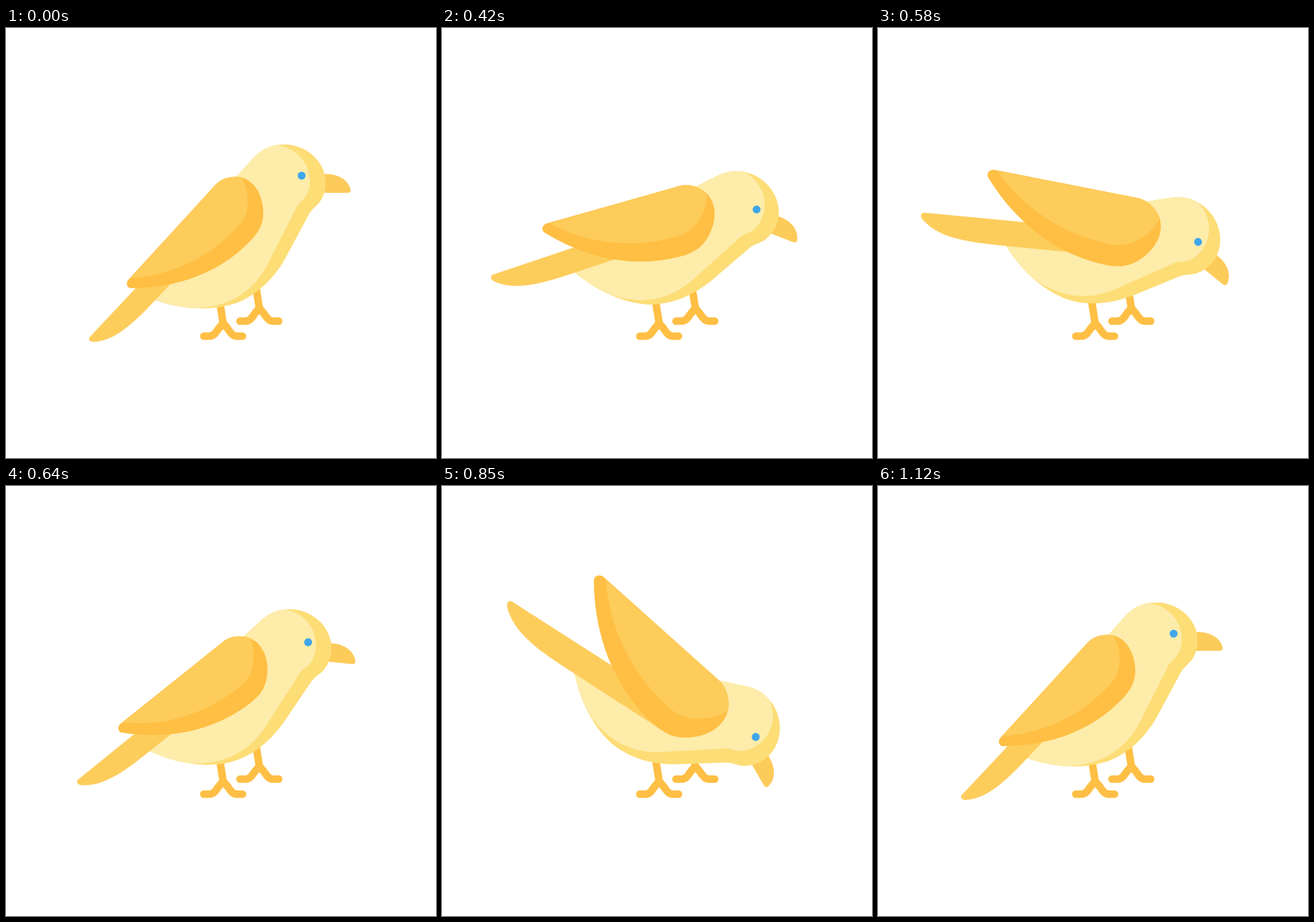
Recreate the animation shown at these times as an HTML page. Size 600 by 600 pixels, loop 1420 ms.

```html
<!DOCTYPE html>
<html lang="en">
<head>
<meta charset="utf-8">
<title>Pecking bird</title>
<style>
  html, body { margin: 0; height: 100%; overflow: hidden; background: #fff; }
  svg { display: block; width: 100%; height: 100%; }
</style>
</head>
<body>
<svg viewBox="0 0 600 600">
  <defs>
    <path id="leg" d="M296 368L303 412M276 430h7c8 0 10-6 14-11l6-7 6 7c4 5 6 11 14 11h7"
      fill="none" stroke="#febf44" stroke-width="10.5" stroke-linecap="round" stroke-linejoin="round"/>
  </defs>
  <use href="#leg" x="50.5" y="-21"/>
  <use href="#leg"/>
  <g id="body">
    <path fill="#fdcb5a" d="M440 204H445C462 203 478 211 481 226C481 229 479 230 477 230H440Z"/>
    <path fill="#fddd76" d="M322 207L340 187C352 172 368 162.5 388 162.5C420 162.5 446 187 446 215C446 230 440 242 433 248C426 254 423 259 421 263L391 319C378 343 355 372 318 385C280 396 240 392 200 377L245 320Z"/>
    <path fill="#fdecaa" d="M322 207L340 187C350 174 362 166 376 163.5C405 166 424 188 424 214C424 228 418 238 410 244C405 249 403 255 400 261L370 320C356 352 328 388 265 391C243 390 225 386 200 377L245 320Z"/>
    <circle cx="412.5" cy="206" r="5.5" fill="#3fa6ea"/>
    <path id="tail" fill="#fdcd5c" d="M117 431L270 268L296 287L209 379C185 404 155 437 122 438C115 438 115 433 117 431Z"/>
    <g id="wing">
      <path fill="#febf44" d="M171 351L292 219C300 210 312 207 322 207.5C345 209 359 232 359 258C359 275 351 286 343 295C300 341 240 363 175 363C168 363 167 355 171 351Z"/>
      <path fill="#fdcc5b" d="M174 349L292 219C300 210 312 206 328 208.5C336 220 338 235 337 248C336 262 329 272 320 281C283 320 230 346 174 349Z"/>
    </g>
  </g>
</svg>
<script>
  const LOOP = 1420, START = 420, STEP = 30, STROKE = 150;
  const [body, tail, wing] = ['body', 'tail', 'wing'].map(id => document.getElementById(id));

  // cubic-bezier(.25, .1, .25, 1)
  function ease(x) {
    const curve = (a, b, p) => 3 * a * p * (1 - p) ** 2 + 3 * b * p * p * (1 - p) + p ** 3;
    let lo = 0, hi = 1;
    for (let i = 0; i < 25; i++) {
      const mid = (lo + hi) / 2;
      if (curve(.25, .25, mid) < x) lo = mid; else hi = mid;
    }
    return curve(.1, 1, lo);
  }

  // How far the bird leans, 0 to 1: two pecks, each a stroke down and a stroke up
  function lean(t) {
    if (t < START) return 0;
    const step = Math.max(0, Math.floor((t - START - 10) / STEP));
    const u = (33.5 + step * 30.1) / STROKE;
    if (u >= 4) return 0;
    const e = ease(u % 1);
    return Math.floor(u) % 2 ? 1 - e : e;
  }

  function turn(el, x, y, angle, scale = 1) {
    el.setAttribute('transform',
      `translate(${x} ${y}) rotate(${angle}) scale(${scale}) translate(${-x} ${-y})`);
  }

  const origin = performance.now();
  function draw() {
    const k = lean((performance.now() - origin) % LOOP);
    turn(body, 300, 300, 61 * k);
    turn(tail, 203, 363, 20 * k, 1 + .2 * k);
    turn(wing, 302.5, 263, 30 * k, 1 + .2 * k);
    requestAnimationFrame(draw);
  }
  draw();
</script>
</body>
</html>
```
